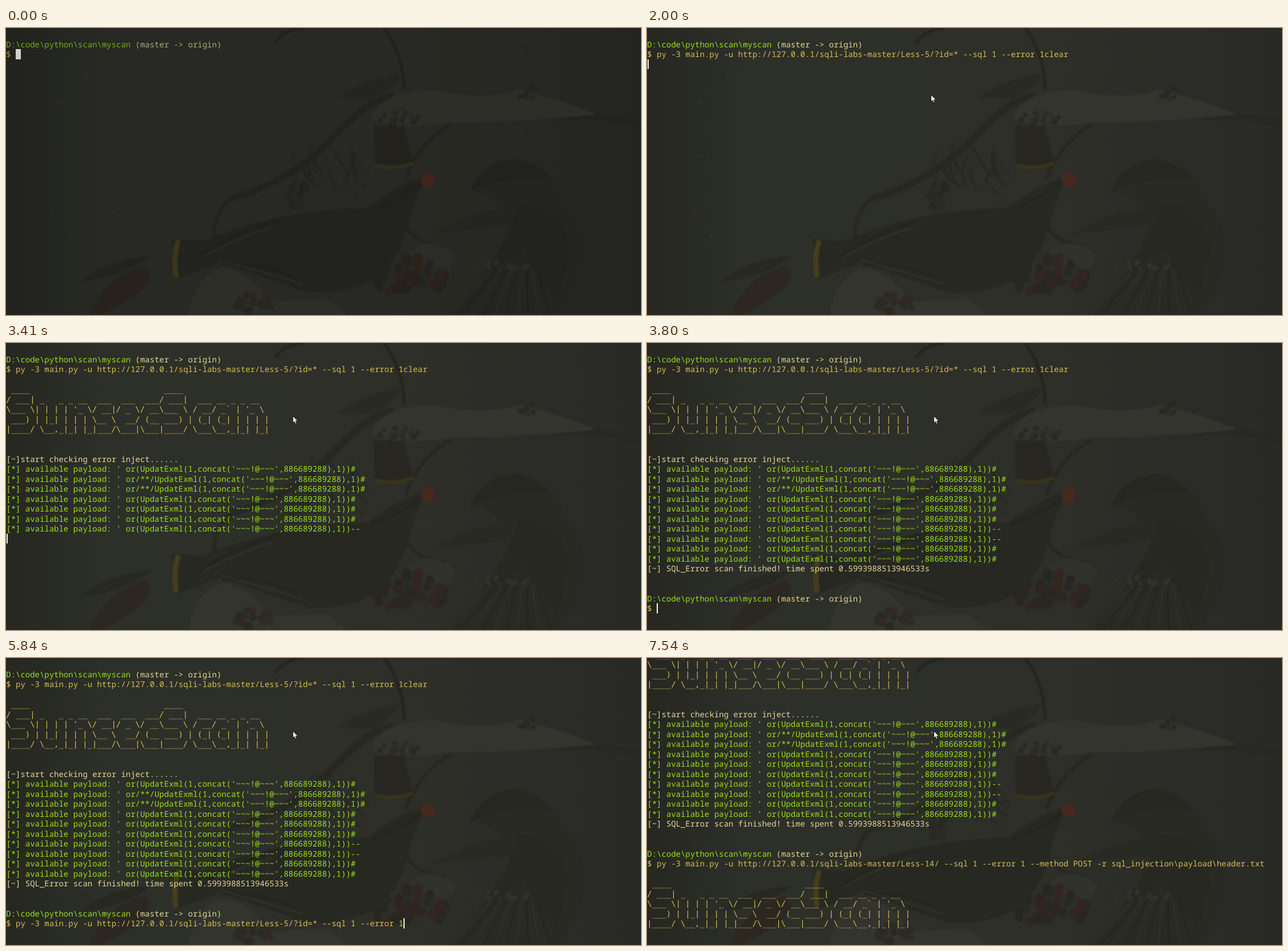
Animation, 1112 px wide and 504 px high, one loop 8000 ms. Source, as an HTML page:

```html
<!DOCTYPE html>
<html lang="en">
<head>
<meta charset="utf-8">
<title>Terminal scan</title>
<style>
  html, body { margin: 0; width: 100%; height: 100%; overflow: hidden; background: #2d2e28; }
  #stage { position: relative; width: 1112px; height: 504px; overflow: hidden; }
  svg { position: absolute; left: 0; top: 0; overflow: visible; }
  #term { position: absolute; left: 0; top: 2.3px; width: 1112px; height: 502px; overflow: hidden; }
  #rows { position: relative; top: .8px; }
  .row {
    position: absolute; left: .3px; height: 17.5px; white-space: pre;
    font: 13.97px/17.5px "Noto Sans Mono", "DejaVu Sans Mono", monospace;
    font-variant-ligatures: none; text-rendering: geometricPrecision;
  }
  .art { font-family: "DejaVu Sans Mono", monospace; font-size: 13.92px; }
  .green { color: #99e21a; }
  .pale { color: #e2da96; }
  .gold { color: #d6bf52; }
  #caret { position: absolute; height: 17.5px; width: 2px; background: #f4f4ee; }
  .idle #caret { width: 9px; background: #d0d0d0; }
  .idle .row { filter: brightness(.77); }
  .idle #wall { filter: brightness(.88); }
</style>
</head>
<body>
<div id="stage">
  <svg id="wall" width="1112" height="504" fill="none">
    <defs>
      <linearGradient id="sides">
        <stop offset="0" stop-color="#262721"/>
        <stop offset=".16" stop-color="#2d2f29"/>
        <stop offset=".6" stop-color="#2e2f29"/>
        <stop offset="1" stop-color="#292a25"/>
      </linearGradient>
      <filter id="soft" color-interpolation-filters="sRGB"><feGaussianBlur stdDeviation="1"/></filter>
    </defs>
    <rect width="1112" height="504" fill="url(#sides)"/>
    <g id="scene" filter="url(#soft)"></g>
  </svg>
  <div id="term"><div id="rows"></div><div id="caret"></div></div>
  <svg id="mouse" width="10" height="15">
    <path d="M.5.5V12.2L3.1 9.8 4.9 14 6.9 13.1 5.1 9.1H8.8Z" fill="#fff" stroke="#111" stroke-width=".8"/>
  </svg>
</div>
<script>
const LOOP = 8000, PITCH = 17.5, ADVANCE = 8.382, BLINK = 550;
const FOCUS_AT = 760, SCROLL_AT = 7540, SCROLL_ROWS = 6;
const $ = id => document.getElementById(id);

// ---- wallpaper: birds on a snowy branch ----
const DARK = "#272822", DEEP = "#24251f", SNOW = "#33342e", YELLOW = "#443e1c", RED = "#46291f";
let seed = 11;
const rand = (lo, hi) => {
  seed = (seed * 16807) % 2147483647;
  return lo + (hi - lo) * seed / 2147483647;
};
function shape(tag, attrs) {
  const el = document.createElementNS("http://www.w3.org/2000/svg", tag);
  for (const key in attrs) el.setAttribute(key, attrs[key]);
  $("scene").append(el);
}
const fill = (color, d) => shape("path", { d, fill: color });
const line = (color, width, d) => shape("path", { d, stroke: color, "stroke-width": width });
function dots(count, cx, cy, spreadX, spreadY, size, colors) {
  for (let i = 0; i < count; i++) {
    const angle = rand(0, 2 * Math.PI), reach = Math.sqrt(rand(0, 1));
    shape("circle", {
      cx: cx + spreadX * reach * Math.cos(angle), cy: cy + spreadY * reach * Math.sin(angle),
      r: size * rand(.6, 1), fill: colors[i % colors.length]
    });
  }
}

function drawBranch() {
  line(DARK, 12, "M392 300Q500 270 570 195T680 120");
  line(DARK, 6, "M392 300Q360 330 365 372M700 265Q720 205 780 168M700 340Q705 375 770 385");
  line(DARK, 12, "M960 156Q1040 150 1112 170");
  for (let i = 0; i < 18; i++) {
    const x = rand(510, 610);
    line(DARK, rand(1.5, 3.5), `M${x} ${rand(200, 250)}q${rand(-30, 20)} 25 ${rand(-15, 35)} ${rand(35, 60)}`);
  }
  dots(14, 512, 292, 25, 26, 8, [DARK, "#2a2b25"]);
  fill(SNOW, "M640 160Q650 112 750 108Q830 130 900 108Q980 128 1034 152Q900 166 780 166Q680 182 640 160Z");
  dots(12, 912, 116, 18, 12, 5, [DARK, "#2d2e28"]);
  dots(20, 690, 160, 35, 12, 5, [DARK, "#2d2e28"]);
}
function drawUpperBird() {
  line(DEEP, 5, "M472 26Q484 4 520 0M662 0Q696 45 697 108");
  fill("#292a24", "M580 122Q630 88 692 80Q680 105 640 124Z");
  fill("#282620", "M645 172H696L714 238Q680 250 646 240Z");
  line("#38351c", 6, "M646 241Q680 250 713 237");
}
function drawCentreBird() {
  fill(DARK, "M290 371L345 374Q480 318 632 316Q680 278 735 260Q715 300 705 340Q680 470 530 465L375 412L300 440Z");
  line(DEEP, 5, "M340 400Q400 360 480 336M380 415Q450 410 510 440M640 318Q690 300 728 272");
  line(YELLOW, 9, "M302 373Q292 400 298 438");
  line("#383932", 1.5, "M345 402Q400 370 465 351M375 408Q450 428 520 450");
  shape("circle", { cx: 739, cy: 267, r: 13, fill: RED });
}
function drawRightBird() {
  fill("#292a24", "M745 362Q820 320 868 318Q855 292 812 287Q835 235 890 230Q960 245 980 310Q1050 390 965 504H770Q860 420 885 345Z");
  fill("#262721", "M812 287Q835 235 890 230Q935 238 955 265Q900 255 812 287Z");
  fill("#272822", "M900 310Q985 310 985 400L965 475Q920 430 910 390L830 440Q880 370 900 310Z");
  for (let i = 0; i < 10; i++)
    line(i % 2 ? DEEP : "#2e2f29", 3, `M${850 + i * 9} 425Q${820 + i * 13} 460 ${775 + i * 20} 504`);
  dots(12, 868, 418, 48, 8, 5, ["#31322c"]);
}
function drawGround() {
  fill(SNOW, "M318 504Q335 430 380 422Q430 428 460 480L560 475L600 504Z");
  fill("#31322c", "M690 405Q740 355 790 400L775 425Z");
  fill(DARK, "M130 446Q180 404 252 401Q210 435 130 446Z");
  fill("#2c2721", "M145 504Q180 430 245 418Q275 450 165 504Z");
  dots(40, 708, 437, 70, 34, 10, ["#2a2520", "#33251f", DARK]);
  dots(14, 425, 484, 45, 15, 8, ["#2b2923", "#302a23"]);
  dots(10, 160, 260, 110, 190, 3, ["#32332d"]);
}
[drawBranch, drawUpperBird, drawGround, drawCentreBird, drawRightBird].forEach(draw => draw());

// ---- terminal session ----
const PROMPT = [["green", "D:\\code\\python\\scan\\myscan "], ["pale", "(master -> origin)"]];
const BASE = "$ py -3 main.py -u http://127.0.0.1/sqli-labs-master/";
const FIRST = BASE + "Less-5/?id=* --sql 1 --error 1";
const POST = BASE + "Less-14/ --sql 1 --error 1 --method POST -r sql_injection\\payload\\header.txt ";
const BANNER = String.raw`
 ____                            ____
/ ___| _   _ _ __  ___  ___  ___/ ___|  ___ __ _ _ __
\___ \| | | | '_ \/ __|/ _ \/ __\___ \ / __/ _${"`"} | '_ \
 ___) | |_| | | | \__ \  __/ (__ ___) | (_| (_| | | | |
|____/ \__,_|_| |_|___/\___|\___|____/ \___\__,_|_| |_|`.slice(1).split("\n").map(text => [["gold art", text]]);

const lines = [], carets = [];
const styled = text => {
  const color = text.startsWith("[*]") ? "green" : text.startsWith("[~]") ? "pale" : "gold";
  return [[color, text]];
};
function addLine(at, row, content) {
  const el = document.createElement("div");
  el.className = "row";
  el.style.top = (row + 1) * PITCH + "px";
  for (const [color, text] of typeof content === "string" ? styled(content) : content) {
    const span = document.createElement("span");
    span.className = color;
    span.textContent = text;
    el.append(span);
  }
  const previous = lines.findLast(l => l.row === row);
  if (previous) previous.until = at;
  lines.push({ el, row, at, until: LOOP });
  $("rows").append(el);
}
// Output leaves the caret on the next row, input leaves it after the text.
function print(at, row, ...contents) {
  contents.forEach((content, i) => addLine(at, row + i, content));
  carets.push({ at, row: row + contents.length, col: 0 });
}
function input(at, row, text) {
  addLine(at, row, text);
  carets.push({ at, row, col: text.length });
}

print(0, 0, PROMPT);
input(0, 1, "$ ");
input(FOCUS_AT, 1, "$ ");
input(1460, 1, FIRST + "clear");
print(2000, 2);
print(2930, 2, "", ...BANNER, "", "", "[~]start checking error inject......");
for (let i = 0; i < 10; i++) {
  const spaced = i === 1 || i === 2, dashed = i === 6 || i === 7;
  const call = "UpdatExml(1,concat('~~~!@~~~',886689288),1)";
  const payload = (spaced ? `/**/${call}` : `(${call})`) + (dashed ? "--" : "#");
  print(3250 + Math.ceil(i / 3) * 77, 11 + i, `[*] available payload: ' or${payload}`);
}
print(3481, 21, "[~] SQL_Error scan finished! time spent 0.5993988513946533s", "");
print(3640, 23, "");
print(3800, 24, PROMPT);
input(3800, 25, "$ ");
input(4120, 25, FIRST + "clear");
input(4270, 25, "$ clear");
input(4730, 25, FIRST);
input(6210, 25, POST);
print(6670, 26);
print(SCROLL_AT, 26, "", ...BANNER);

// ---- playback ----
const mousePath = [
  [120, 983, 455], [590, 501, 93], [760, 503, 95], [1310, 497, 117], [2150, 497, 117],
  [2230, 484, 119], [2310, 500, 121], [2540, 500, 121], [2700, 502, 128]
];
function mouseAt(t) {
  const i = mousePath.findLastIndex(key => key[0] <= t);
  if (i < 0) return null;
  const [t0, x0, y0] = mousePath[i];
  const [t1, x1, y1] = mousePath[i + 1] ?? [LOOP, x0, y0];
  const p = (t - t0) / (t1 - t0), eased = p * (2 - p);
  return [x0 + (x1 - x0) * eased, y0 + (y1 - y0) * eased];
}

function render(t) {
  const idle = t < FOCUS_AT, scrolled = t >= SCROLL_AT;
  $("stage").className = idle ? "idle" : "";
  for (const { el, at, until } of lines)
    el.style.display = t >= at && t < until ? "" : "none";
  $("rows").style.transform = scrolled ? `translateY(${-SCROLL_ROWS * PITCH}px)` : "";

  const { at, row, col } = carets.findLast(c => c.at <= t);
  const lit = idle || Math.floor((t - at) / BLINK) % 2 === 0;
  const caret = $("caret").style;
  caret.display = lit && !scrolled ? "" : "none";
  caret.left = Math.round(col * ADVANCE + .7) + "px";
  caret.top = (row + 1) * PITCH + "px";

  const pos = mouseAt(t);
  $("mouse").style.display = pos ? "" : "none";
  if (pos) $("mouse").style.transform = `translate(${pos.map(v => Math.round(v) + "px")})`;
}

const start = performance.now();
function tick() {
  render((performance.now() - start) % LOOP);
  requestAnimationFrame(tick);
}
tick();
</script>
</body>
</html>
```
